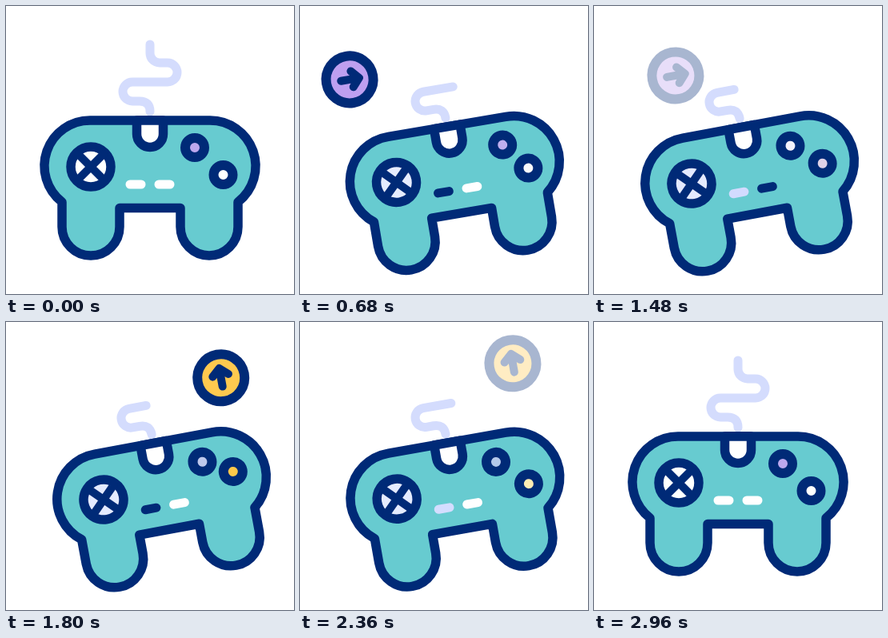
Recreate the animation shown at these times as an HTML page. Size 360 by 360 pixels, loop 3 s.

```html
<!DOCTYPE html>
<html lang="en">
<head>
<meta charset="utf-8">
<title>Game controller</title>
<style>
  html, body { margin: 0; width: 100%; height: 100%; overflow: hidden; background: #fff; }
  svg { display: block; width: 100%; height: 100%; }
  .line { fill: none; stroke: #002a77; stroke-width: 11.5; stroke-linecap: round; stroke-linejoin: round; }
  .ring { stroke: #002a77; stroke-width: 12; }
</style>
</head>
<body>
<svg viewBox="0 0 360 360">
  <g id="pad">
    <path id="cable" fill="none" stroke="#d4dcfd" stroke-width="11" stroke-linecap="round" stroke-linejoin="round"
      d="M180 48V59A12 12 0 0 0 192 71H202A12 12 0 0 1 202 95H158A12 12 0 0 0 158 119H167Q180 119 180 132"/>
    <g id="right">
      <circle class="ring" r="29.5" fill="#be9ff0"/>
      <path class="line" style="stroke-width:10" d="M-11 0H12M3-10L12 0L3 10"/>
    </g>
    <g id="up">
      <circle class="ring" r="29.5" fill="#ffc94f"/>
      <path class="line" style="stroke-width:10" d="M0 11V-12M-10-3L0-12L10-3"/>
    </g>
    <path class="line" style="fill:#67cbd0"
      d="M105.5 143H254.5A57 57 0 0 1 290 245V276A36 36 0 0 1 218 276V252.5H142V276A36 36 0 0 1 70 276V245A57 57 0 0 1 105.5 143Z"/>
    <path class="line" style="fill:#fff" d="M163.5 143V160A16.5 16.5 0 0 0 196.5 160V143Z"/>
    <g transform="translate(106 201)">
      <circle id="cross" class="line" r="25"/>
      <path class="line" style="stroke-width:10" d="M-16-16L16 16M16-16L-16 16"/>
    </g>
    <circle id="btnA" class="ring" r="12"/>
    <circle id="btnB" class="ring" r="12"/>
    <rect id="slotL" x="149.5" y="217.5" width="25" height="11" rx="5.5"/>
    <rect id="slotR" x="185.5" y="217.5" width="25" height="11" rx="5.5"/>
  </g>
</svg>
<script>
const LOOP = 3000, STEP = 40, TILT = -10.5;
const el = Object.fromEntries([...document.querySelectorAll('[id]')].map(e => [e.id, e]));
const cableLength = el.cable.getTotalLength();

const linear = x => x;
const smooth = x => x * x * (3 - 2 * x);
const ramp = (t, a, b, ease = smooth) => ease(Math.min(1, Math.max(0, (t - a) / (b - a))));
const mix = (a, b, p) => a + (b - a) * p;
const place = (node, x, y) => node.setAttribute('transform', `translate(${x} ${y})`);

// Each colour track is a list of [time, r, g, b].
const tintA = [[0, 189, 168, 238], [680, 191, 174, 238], [1000, 181, 150, 234],
  [1240, 181, 150, 234], [1480, 244, 242, 252], [1800, 190, 200, 236],
  [2360, 180, 200, 234], [2960, 189, 168, 238]];
const tintB = [[0, 255, 255, 255], [1240, 246, 246, 250], [1480, 224, 210, 232],
  [1640, 255, 200, 74], [2200, 255, 200, 74], [2360, 255, 236, 180], [2480, 255, 255, 255]];

function tint(track, t) {
  let i = track.findIndex(k => k[0] > t);
  if (i < 0) i = track.length;
  const a = track[i - 1], b = track[i] || a;
  const p = a === b ? 0 : (t - a[0]) / (b[0] - a[0]);
  return `rgb(${[1, 2, 3].map(n => Math.round(mix(a[n], b[n], p)))})`;
}

function draw(t) {
  const tilt = ramp(t, 120, 800) - ramp(t, 2270, 2960);
  el.pad.setAttribute('transform', `rotate(${TILT * tilt} 228.5 124.5)`);

  const pulled = 99.5 * (ramp(t, 160, 780, linear) - ramp(t, 2270, 2920, linear));
  el.cable.setAttribute('stroke-dasharray', `0 ${pulled} ${cableLength} 999`);
  el.cable.setAttribute('stroke-linecap', 'butt');
  drawCable(pulled);

  const inR = ramp(t, 570, 750), outR = ramp(t, 1370, 1550);
  place(el.right, mix(44, 83, inR) + 42 * outR, 64.5);
  el.right.setAttribute('opacity', Math.min(1, inR / .65) * (1 - outR));

  const inU = ramp(t, 1480, 1660), outU = ramp(t, 2250, 2430);
  place(el.up, 278, mix(108, 78, inU) - 28 * outU);
  el.up.setAttribute('opacity', Math.min(1, inU / .65) * (1 - outU));

  place(el.btnA, 236 + 13 * (inR - ramp(t, 1200, 1380)), 177);
  place(el.btnB, 271.5, 211 - 15 * (ramp(t, 1410, 1590) - ramp(t, 2080, 2260)));
  el.btnA.setAttribute('fill', tint(tintA, t));
  el.btnB.setAttribute('fill', tint(tintB, t));

  const press = t >= 640 && t < 2320 ? Math.floor((t - 640) / 240) % 2 : -1;
  const pale = `rgb(${mix(255, 210, tilt)},${mix(255, 219, tilt)},255)`;
  el.slotL.setAttribute('fill', press === 0 ? '#002a77' : pale);
  el.slotR.setAttribute('fill', press === 1 ? '#002a77' : '#fff');
  el.cross.style.fill = `rgb(${mix(255, 228, tilt)},${mix(255, 234, tilt)},255)`;
}

// Trims the start of the cable while keeping its round end.
function drawCable(pulled) {
  el.cable.setAttribute('stroke-linecap', 'round');
  el.cable.setAttribute('stroke-dasharray', `${cableLength - pulled} 999`);
  el.cable.setAttribute('stroke-dashoffset', -pulled);
}

const start = performance.now();
function tick() {
  const t = (performance.now() - start) % LOOP;
  draw(Math.floor(t / STEP) * STEP);
  requestAnimationFrame(tick);
}
tick();
</script>
</body>
</html>
```
